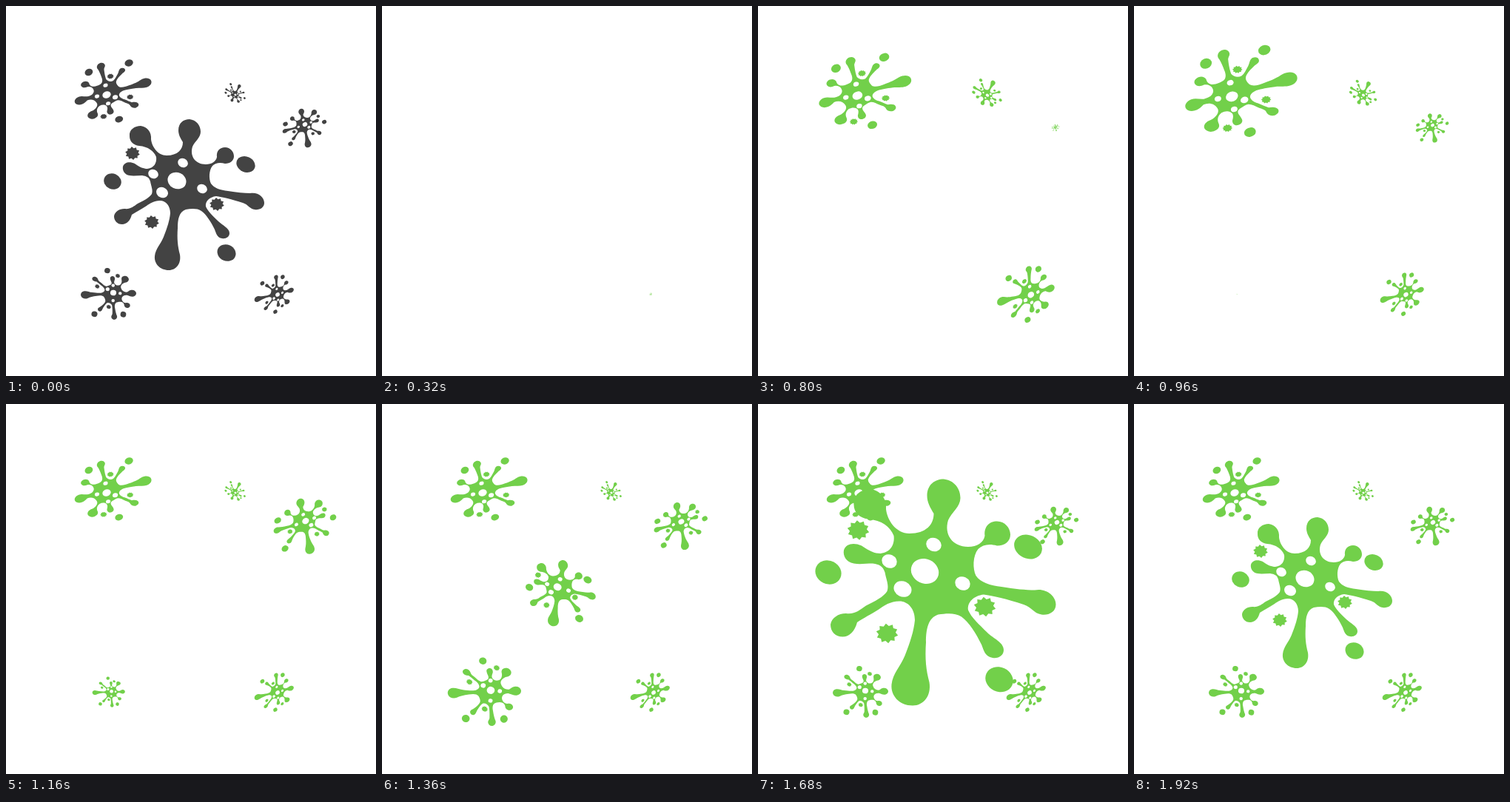
An HTML page for the animation above (2040 ms loop, 500 by 500 pixels).

```html
<!DOCTYPE html>
<html lang="en">
<head>
<meta charset="utf-8">
<title>Splats</title>
<style>
  html, body { margin: 0; width: 100%; height: 100%; overflow: hidden; background: #fff; }
  svg { display: block; width: 100vw; height: 100vh; }
  .hole { fill: #fff; }
</style>
</head>
<body>
<svg id="stage" viewBox="0 0 500 500">
  <defs>
    <g id="body">
      <path d="M167 176C166 167 174 162 182 162C191 163 197 171 196 180C197 190 205 202 217 202
        C232 202 239 194 239 184C236 179 233 174 233 168C233 158 240 153 248 153
        C257 154 263 161 263 170C263 178 255 183 252 190C248 203 256 214 270 214
        C278 214 284 210 285 204C284 196 289 191 296 191C303 191 308 197 308 203
        C308 209 303 213 296 213C289 211 283 212 279 216C274 222 274 234 277 240
        C281 246 290 249 300 250C312 252 322 253 330 253C340 251 349 258 349 266
        C349 273 342 276 336 275C329 274 327 268 320 266C305 261 292 258 284 257
        C275 258 269 264 270 271C273 278 280 284 287 291C293 297 302 300 302 307
        C302 312 297 315 292 314C285 313 284 307 282 302C277 292 271 282 264 277
        C258 273 250 274 243 275C234 278 232 288 232 300C231 315 232 325 235 336
        C237 348 230 357 220 357C208 357 200 348 201 338C202 328 209 322 213 312
        C218 299 221 290 222 280C222 270 216 263 208 263C200 263 194 267 190 270
        C182 275 176 278 170 282C168 290 163 295 157 295C150 295 146 290 146 284
        C147 278 153 274 160 274C168 275 172 271 178 267C186 263 194 259 197 254
        C199 249 196 243 195 237C193 231 190 230 184 229C178 229 172 230 167 229
        C160 228 157 222 158 217C160 211 167 210 174 213C181 218 186 220 191 220
        C200 219 204 212 203 204C200 196 192 190 180 189C172 188 167 183 167 176Z"/>
    </g>
  </defs>
</svg>
<script>
const LOOP = 2040, STEP = 40, RISE = 480, FALL = 240, PEAK = 1.5;
const DARK = '#434343', GREEN = '#72d04a';
const HUB = [231, 236];
const stage = document.getElementById('stage');
const defs = stage.querySelector('defs');

function add(parent, tag, attrs) {
  const el = document.createElementNS('http://www.w3.org/2000/svg', tag);
  for (const key in attrs) el.setAttribute(key, attrs[key]);
  return parent.appendChild(el);
}

function oval(parent, x, y, rx, ry, cls = '') {
  add(parent, 'ellipse', { rx, ry, class: cls, transform: `translate(${x} ${y}) rotate(25)` });
}

function burr(parent, x, y) {
  const points = Array.from({ length: 20 }, (_, i) => {
    const r = i % 2 ? 7.6 : 10, a = i * Math.PI / 10 + 0.2;
    return [x + r * Math.cos(a), y + r * 0.9 * Math.sin(a)].map(v => v.toFixed(1));
  });
  add(parent, 'polygon', { points: points.join(' ') });
}

function drops(id, ovals, burrs) {
  const g = add(defs, 'g', { id });
  ovals.forEach(o => oval(g, ...o));
  burrs.forEach(b => burr(g, ...b));
}

const body = document.getElementById('body');
[[231, 236, 12.8, 11], [239, 212, 7, 6], [199, 227, 7, 6], [211, 252, 8.2, 7], [265, 247, 7, 6]]
  .forEach(o => oval(body, ...o, 'hole'));

drops('near', [[324, 214, 13, 10.5], [144, 237, 12, 10.5], [298, 333.5, 12.8, 11]],
  [[171, 199], [285, 268], [197, 292]]);
drops('far', [[333, 228, 13, 10.5], [130, 229, 12, 10.5], [309, 332, 12.8, 11]],
  [[161, 198], [289, 271], [191, 286]]);

// start time, hub position, shape matrix, scaling origin
const splats = [
  { start: 280, hub: [367, 390], shape: [.0477, -.2317, -.2537, .0287], origin: [363, 389.5] },
  { start: 360, hub: [310, 120], shape: [-.125, -.037, .036, -.119], origin: [310, 118.5] },
  { start: 440, hub: [136, 120], shape: [-.199, -.314, .475, -.193], origin: [144, 115] },
  { start: 720, hub: [404, 160], shape: [-.2588, .0155, .0073, .26], origin: [402, 164.5] },
  { start: 960, hub: [145, 387.5], shape: [.1045, .2918, -.3505, .063], origin: [139, 389.5] },
  { start: 1200, hub: HUB, shape: [1, 0, 0, 1], origin: [242, 256], drops: 'near' }
];

for (const s of splats) {
  s.el = add(stage, 'g', {});
  const placed = add(s.el, 'g', {
    transform: `matrix(${s.shape} ${s.hub}) translate(${HUB.map(v => -v)})`
  });
  add(placed, 'use', { href: '#body' });
  add(placed, 'use', { href: '#' + (s.drops || 'far') });
}

const easeRise = p => (p + (1 - Math.cos(Math.PI * p)) / 2) / 2;
const easeFall = q => q ** 1.4;

function scaleAt(t) {
  if (t < 0) return 0;
  if (t < RISE) return Math.max(0.02, PEAK * easeRise(t / RISE));
  if (t < RISE + FALL) return PEAK - (PEAK - 1) * easeFall((t - RISE) / FALL);
  return 1;
}

function draw(t) {
  const flash = t < STEP;
  stage.setAttribute('fill', flash ? DARK : GREEN);
  for (const { el, start, origin: [x, y] } of splats) {
    const k = flash ? 1 : scaleAt(t - start);
    el.setAttribute('visibility', k ? 'visible' : 'hidden');
    el.setAttribute('transform', `translate(${x} ${y}) scale(${k}) translate(${-x} ${-y})`);
  }
}

// The motion advances in 40 ms steps.
const begin = performance.now();
function tick() {
  const t = (performance.now() - begin) % LOOP;
  draw(Math.floor(t / STEP) * STEP);
  requestAnimationFrame(tick);
}
tick();
</script>
</body>
</html>
```
